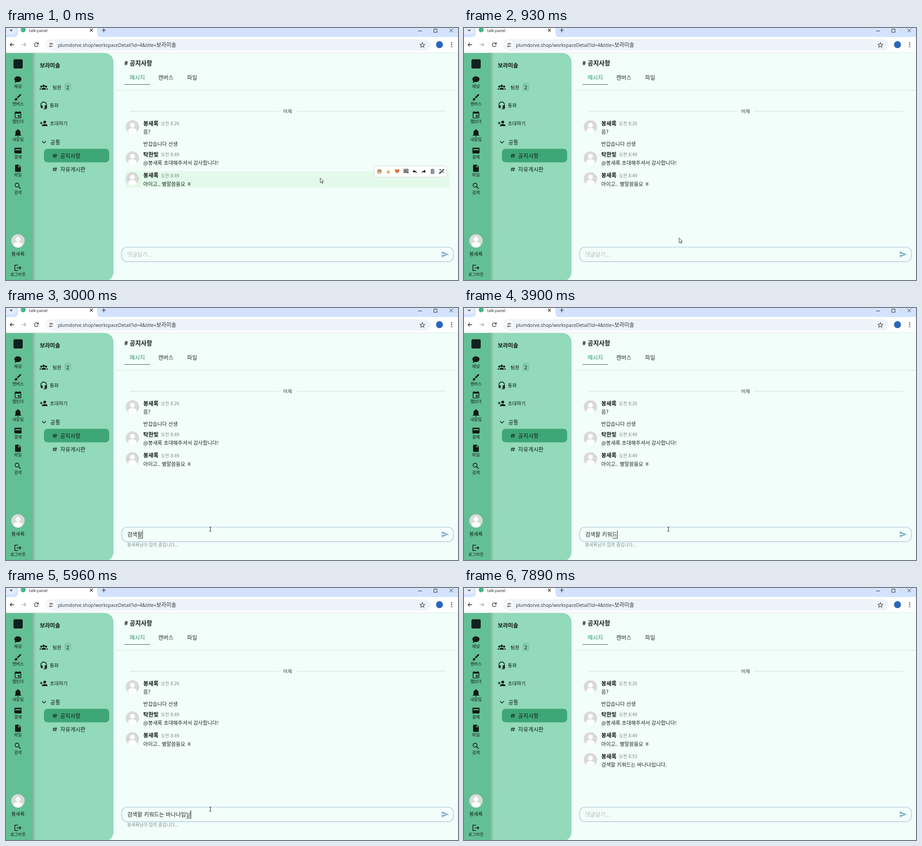
Recreate the animation shown at these times as an HTML page. Size 1001 px wide and 560 px high, loop 8 s.

```html
<!DOCTYPE html>
<html lang="ko">
<head>
<meta charset="utf-8">
<title>Chat</title>
<style>
  html, body { margin: 0; width: 100%; height: 100%; overflow: hidden; background: #f2fefa; }
  svg { display: block; }
  text { font-family: "Noto Sans CJK KR", "Noto Sans CJK", "Noto Sans", sans-serif; white-space: pre; }
  .ui { font-family: "Open Sans", sans-serif; }
</style>
</head>
<body>
<svg id="stage" width="1001" height="560" viewBox="0 0 1001 560">
  <defs>
    <linearGradient id="shade">
      <stop offset="0" stop-opacity=".2"/><stop offset="1" stop-opacity="0"/>
    </linearGradient>
    <clipPath id="disc"><circle r="15"/></clipPath>
    <g id="avatar" clip-path="url(#disc)">
      <circle r="15" fill="#d9d9d9"/>
      <circle cy="-3.8" r="5.4" fill="#fff"/>
      <ellipse cy="9" rx="9.6" ry="6.6" fill="#fff"/>
    </g>
  </defs>
</svg>
<script>
const stage = document.getElementById('stage');
const INK = '#111a16';

function add(tag, attrs, parent = stage) {
  const el = document.createElementNS('http://www.w3.org/2000/svg', tag);
  for (const name in attrs) el.setAttribute(name, attrs[name]);
  return parent.appendChild(el);
}
const box = (x, y, width, height, rx, fill, more, parent) =>
  add('rect', { x, y, width, height, rx, fill, ...more }, parent);
const dot = (cx, cy, r, fill, parent) => add('circle', { cx, cy, r, fill }, parent);
const line = (d, stroke, width = 1, parent) =>
  add('path', { d, stroke, 'stroke-width': width, fill: 'none' }, parent);

// Text is placed by its left (or middle) edge and its vertical centre.
function label(x, cy, str, size, fill = INK, more = {}, parent) {
  const el = add('text', { x, y: cy + size * 0.37, 'font-size': size, fill, ...more }, parent);
  el.textContent = str;
  return el;
}
const bold = { 'font-weight': 700 }, medium = { 'font-weight': 500 };
const middle = { 'text-anchor': 'middle', ...medium };

// Icons are drawn on a 24-unit grid around their centre.
function icon(d, cx, cy, { fill = INK, stroke = 'none', size = 18.3, weight = 2 } = {}, parent) {
  const s = size / 24;
  return add('path', { d, fill, stroke, 'stroke-width': weight, 'fill-rule': 'evenodd',
    transform: `translate(${cx - size / 2} ${cy - size / 2}) scale(${s})` }, parent);
}
const outline = { fill: 'none', stroke: INK };
const avatar = (x, y, parent) => add('use', { href: '#avatar', transform: `translate(${x} ${y})` }, parent);

const ME = '봉새록', MATE = '탁한빛', TEAM = '보라미솔';

function drawBrowser() {
  box(0, 0, 1001, 21, 0, '#d3e3fd');
  box(0, 20, 1001, 35, 0, '#fff');
  add('path', { d: 'M18 20q8 0 8-8V0h176v12q0 8 8 8z', fill: '#fff' });
  box(-6, -8, 28, 22, 7, '#e4edfd');
  line('M8.500 3.500l3 3 3-3', '#222', 1.3);
  dot(38, 4, 5.5, '#41b883');
  label(51, 6, 'talk-panel', 8.9, '#222', { class: 'ui' });
  line('M186 2l6 6M192 2l-6 6M212 5h9M216.500 .5v9', '#222', 1.2);
  line('M913 6.500h8M947.500 2.500h7v7h-7zM982 1.500l8 8M990 1.500l-8 8', '#222', 1);
  line('M18 37H9M13 33l-4 4 4 4', '#333', 1.3);
  line('M35 37h9M40 33l4 4-4 4', '#a9adb1', 1.3);
  line('M70.800 35a4.200 4.200 0 1 0 .3 3.500M71.500 32v3.500H68', '#333', 1.3);
  box(87, 25, 853, 25, 12.5, '#edf2fb');
  dot(100, 37.5, 9.3, '#fff');
  line('M95 35h3M102 35h3M95 40.500h2M101 40.500h4', '#333', 1.2);
  line('M98.500 35a1.500 1.500 0 1 0 3 0a1.500 1.500 0 1 0-3 0M97 40.500a1.500 1.500 0 1 0 3 0a1.500 1.500 0 1 0-3 0', '#333', 1.1);
  label(115, 38, 'plumdorve.shop/workspaceDetail?id=4&title=', 10.25, '#30343a', { class: 'ui' });
  label(333, 37.5, TEAM, 12, '#30343a');
  icon('M12 2l3 7 7.500.6-5.700 5 1.800 7.400L12 18l-6.600 4 1.800-7.400-5.700-5L9 9z', 922, 37.5,
    { fill: 'none', stroke: '#333', size: 12.5 });
  dot(960, 37, 7.7, '#2b66bd');
  for (const y of [33, 37.3, 41.6]) dot(987, y, 1.2, '#333');
  box(0, 54.5, 1001, 1, 0, '#dfe7e5');
}

function drawSidebar() {
  box(30, 55.5, 208, 507, 20, '#92dab9');
  box(0, 55.5, 57, 505, 0, '#63bf95');
  box(57, 55.5, 9, 505, 0, 'url(#shade)');
  box(16.5, 69.5, 20.5, 20.5, 3, '#10201a');

  const rail = [
    ['채널', 'M12 3a10 8 0 1 1-3.500 15.500Q6 21 2 21q3-3 2.700-4.500A10 8 0 0 1 12 3z'],
    ['캔버스', 'M18 3.300q.7-.7 1.400 0l1.300 1.300q.7.7 0 1.400L11.700 15 9 12.200zM7 14a3 3 0 0 1 3 3 4 4 0 0 1-4 4q-2.500 0-4-2 2-.5 2-2a3 3 0 0 1 3-3z'],
    ['캘린더', 'M6 1h2v2h8V1h2v2h1q2 0 2 2v14q0 2-2 2H5q-2 0-2-2V5q0-2 2-2h1zM5 8v11h14V8zM12 12h5v5h-5z'],
    ['내알림', 'M10 4.300V4a2 2 0 0 1 4 0v.3q5 1.700 5 6.700v6l2 2v1H3v-1l2-2v-6q0-5 5-6.700zM10 21h4a2 2 0 0 1-4 0z'],
    ['결제', 'M4 4h16q2 0 2 2v12q0 2-2 2H4q-2 0-2-2V6q0-2 2-2zM4 8v3h16V8z'],
    ['파일', 'M6 2h8l6 6v12q0 2-2 2H6q-2 0-2-2V4q0-2 2-2zM13 3.500V9h5.500z'],
    ['검색', 'M9.500 4a5.500 5.500 0 1 1 0 11a5.500 5.500 0 1 1 0-11M13.500 13.500l6.300 6.300', outline]
  ];
  rail.forEach(([name, d, style], i) => {
    const y = 114.5 + i * 39.45;
    icon(d, 26.5, y, { ...style, size: 19 });
    label(26.5, y + 14.7, name, 9.15, INK, middle);
  });
  avatar(26.5, 473);
  label(26.5, 502.5, ME, 10.7, INK, middle);
  icon('M12 4H3v16h9M8 12h12M16 7.700l4.500 4.300-4.500 4.300', 26.5, 533, outline);
  label(26.5, 547.5, '로그아웃', 9.15, INK, middle);

  label(75, 83, TEAM, 12.2, INK, bold);
  icon('M8.500 9a3.500 3.500 0 1 1 7 0 3.500 3.500 0 1 1-7 0zM2 11a3 3 0 1 1 6 0 3 3 0 1 1-6 0zM16 11a3 3 0 1 1 6 0 3 3 0 1 1-6 0z' +
    'M5.500 20v-2q1-3.500 6.500-3.500t6.500 3.500v2zM0 20v-1.500q.5-2.500 4.500-3-1 1-1 4.500zM24 20v-1.500q-.5-2.500-4.500-3 1 1 1 4.500z', 83.5, 131);
  label(103, 132, '팀원', 10.7, INK, medium);
  box(129, 122, 15.5, 19, 6, '#83c9a9');
  label(136.7, 132, '2', 10.7, INK, middle);
  icon('M4 12v-2a8 8 0 0 1 16 0v10q0 2-2 2h-6', 83.5, 172, outline);
  icon('M3 12h6v8H6q-3 0-3-3zM15 12h6v8h-6z', 83.5, 172);
  label(97, 172.5, '통화', 10.7, INK, medium);
  icon('M11 8a4 4 0 1 1 8 0 4 4 0 1 1-8 0zM7 20v-2q1-4 8-4t8 4v2zM4 7h2v3h3v2H6v3H4v-3H1v-2h3z', 83.5, 212);
  label(97, 212.5, '초대하기', 10.7, INK, medium);
  icon('M6.500 9.500l5.500 5.500 5.500-5.500', 84, 253.5, outline);
  label(98, 254, '공통', 12.2);
  box(84, 268.5, 144.5, 30, 8, '#3fa678');
  [['공지사항', 284], ['자유게시판', 314]].forEach(([name, y]) => {
    icon('M10 4L8 20M17 4l-2 16M4 9h17M3 15h17', 108, y, { ...outline, size: 13.5 });
    label(120, y, name, 12.2, INK, medium);
  });
}

function drawMessage(nameY, name, time, text, parent) {
  avatar(280, nameY + 7.8, parent);
  label(304, nameY, name, 12.2, INK, bold, parent);
  label(343, nameY + 0.5, time, 10, '#7d8784', {}, parent);
  label(304, nameY + 19, text, 11.35, '#1b2421', {}, parent);
}

function drawHoverTools(parent) {
  box(815.5, 306.5, 160.5, 24.5, 4, '#fff', { stroke: '#d3d8d6' }, parent);
  const y = 318.5, at = i => 827 + i * 19.6;
  dot(at(0), y, 5.2, '#c9a878', parent);
  dot(at(0) - 1.8, y - 1.4, 0.9, '#4a3a2a', parent);
  dot(at(0) + 1.8, y - 1.4, 0.9, '#4a3a2a', parent);
  add('path', { d: `M${at(0) - 3} ${y + 0.8}h6q-.6 2.800-3 2.800t-3-2.800z`, fill: '#fff', stroke: '#6b5339', 'stroke-width': 0.5 }, parent);
  icon('M10 2q4 0 3 8h5q3 0 2 3l-2 8q-1 2-3 2H9q-4 0-4-4v-5q5-4 5-12z', at(1), y, { fill: '#e9b872', size: 11.5 }, parent);
  icon('M12 22Q1 13 1 8q0-6 6-6 3.500 0 5 3 1.500-3 5-3 6 0 6 6 0 5-11 14z', at(2), y, { fill: '#e2703f', size: 11 }, parent);
  const tools = [
    'M2 2h20v20l-4-4H2zM4 4v12h16V4zM6 6h12v2H6zM6 9h12v2H6zM6 12h12v2H6z',
    'M10 9V5l-7 7 7 7v-4q8 0 11 5-1-9-11-11z',
    'M14 9V5l7 7-7 7v-4q-8 0-11 5 1-9 11-11z',
    'M9 2h6v1h5v2H4V3h5zM5 7h14v15H5zM7 9v11h10V9zM9 10h2v9H9zM13 10h2v9h-2z'
  ];
  tools.forEach((d, i) => icon(d, at(3 + i), y, { size: 12.5, fill: i === 3 ? '#1b2a4a' : INK }, parent));
  icon('M3 20L16 7l2 2L5 22zM18 5l2-2 2 2-2 2zM7 2v6M4 5h6M19 14v5M16.500 16.500h5', at(7), y,
    { ...outline, size: 12.5 }, parent);
}

drawBrowser();
drawSidebar();

label(262, 78, '# 공지사항', 13.6, INK, bold);
label(274, 110, '메시지', 12.2, '#2f9468', medium);
label(337, 110, '캔버스', 12.2, '#26302c', medium);
label(401, 110, '파일', 12.2, '#26302c', medium);
box(262, 125, 57, 1, 0, '#46544f');
box(243, 137.5, 758, 1, 0, '#d8e4e0');
line('M274 185h331M643 185h330', '#cfdad7');
label(623.5, 185.5, '어제', 10.7, '#33403b', middle);

const hover = add('g');
box(264, 318, 718, 36.5, 5, '#e3faea', {}, hover);
drawHoverTools(hover);
drawMessage(212, ME, '오전 8:26', '음?');
label(304, 258, '반갑습니다 선생', 11.35, '#1b2421');
drawMessage(281.2, MATE, '오전 8:49', `@${ME} 초대해주셔서 감사합니다!`);
drawMessage(327.5, ME, '오전 8:49', '아이고.. 별말씀을요 ㅎ');
const sent = add('g');
drawMessage(374, ME, '오전 8:53', '검색할 키워드는 바나나입니다.', sent);

box(256, 487, 735, 32.3, 12, 'none', { stroke: '#9dc1d3', 'stroke-width': 1.2 });
icon('M2 21L23 12 2 3v7l15 2-15 2z', 972.5, 503, { fill: '#8db0cd' });
const LEFT = 268.4;
const placeholder = label(LEFT, 503.5, '댓글달기...', 12.2, '#b3bdba');
const typed = label(LEFT, 503.5, '', 12.2, '#1b2421');
const underline = box(0, 511, 0, 1, 0, '#222');
const caret = box(0, 494, 1, 18, 0, '#222');
const typing = label(268, 526, `${ME}님이 입력 중입니다...`, 9.9, '#84908c');

const arrow = add('path', { d: 'M0 0v10.500l2.400-2.200 1.700 3.700 1.600-.7-1.600-3.600h3.200z', fill: '#fff', stroke: '#222', 'stroke-width': 0.9 });
const beam = line('M-2.500-4.500h2l.5.5.5-.5h2M0-4v8M-2.500 4.500h2l.5-.5.5.5h2', '#222');

// Each key press: time and the field's text afterwards.
const keys = [
  [1540, 'ㄱ'], [2210, '거'], [2320, '검'], [2430, '검ㅅ'], [2550, '검새'], [2660, '검색'],
  [2800, '검색ㅎ'], [2900, '검색하'], [3000, '검색할'], [3100, '검색할 '],
  ...spell('검색할 ', [[3240, 'ㅋ'], [3300, '키'], [3440, '킹'], [3580, '키우'], [3650, '키워'], [3710, '키웓'],
    [3900, '키워드'], [4100, '키워드느'], [4240, '키워드는'], [4370, '키워드는 ']]),
  ...spell('검색할 키워드는 ', [[4630, 'ㅂ'], [4700, '바'], [4770, '반'], [4970, '바난'], [5230, '바나나'], [5500, '바나낭']]),
  ...spell('검색할 키워드는 바나나', [[5640, '이'], [5720, '입'], [5800, '입ㄴ'], [5880, '입니'], [5950, '입닏'],
    [6030, '입니다'], [6230, '입니다.']])
];
function spell(prefix, steps) {
  return steps.map(([time, text]) => [time, prefix + text]);
}

const path = [[120, 696, 333.5], [930, 476.5, 466.5], [1450, 452.5, 491.5], [7560, 452.5, 491.5],
  [7630, 357, 490], [7700, 230, 450], [7765, 107, 395], [7830, 59, 364]];
function pointer(t) {
  if (t <= path[0][0]) return path[0].slice(1);
  const i = path.findIndex(p => p[0] > t);
  if (i < 0) return path[path.length - 1].slice(1);
  const [t0, x0, y0] = path[i - 1], [t1, x1, y1] = path[i];
  let u = (t - t0) / (t1 - t0);
  if (i === 1) u = u * u * (3 - 2 * u);
  if (i === 2) u = 1 - (1 - u) ** 2;
  return [x0 + (x1 - x0) * u, y0 + (y1 - y0) * u];
}

const show = (el, on) => el.setAttribute('visibility', on ? 'visible' : 'hidden');
const LOOP = 8000, BLINK = 530, SEND = 6960;

function render(t) {
  const last = keys.filter(k => k[0] <= t).pop() || [250, ''];
  const text = t < SEND ? last[1] : '';
  if (typed.textContent !== text) typed.textContent = text;
  const width = text ? typed.getComputedTextLength() : 0;
  const composing = text && !/[ .]$/.test(text);
  if (composing) {
    const start = text.length > 1 ? typed.getSubStringLength(0, text.length - 1) : 0;
    underline.setAttribute('x', LEFT + start + 0.5);
    underline.setAttribute('width', width - start - 0.5);
  }
  show(underline, composing);
  show(placeholder, !text);
  caret.setAttribute('x', Math.floor(LEFT + width));
  show(caret, t >= last[0] && Math.floor((t - last[0]) / BLINK) % 2 === 0);
  show(typing, t >= 1610 && t < 7100);
  show(sent, t >= 7030);

  const [x, y] = pointer(t), inField = x > 256 && y > 487, visible = t < 7890;
  for (const el of [arrow, beam]) el.setAttribute('transform', `translate(${x} ${y})`);
  show(arrow, visible && !inField);
  show(beam, visible && inField);
  show(hover, x > 264 && y > 318 && y < 354.5);
}

function tick() {
  render(performance.now() % LOOP);
  requestAnimationFrame(tick);
}
tick();
</script>
</body>
</html>
```
